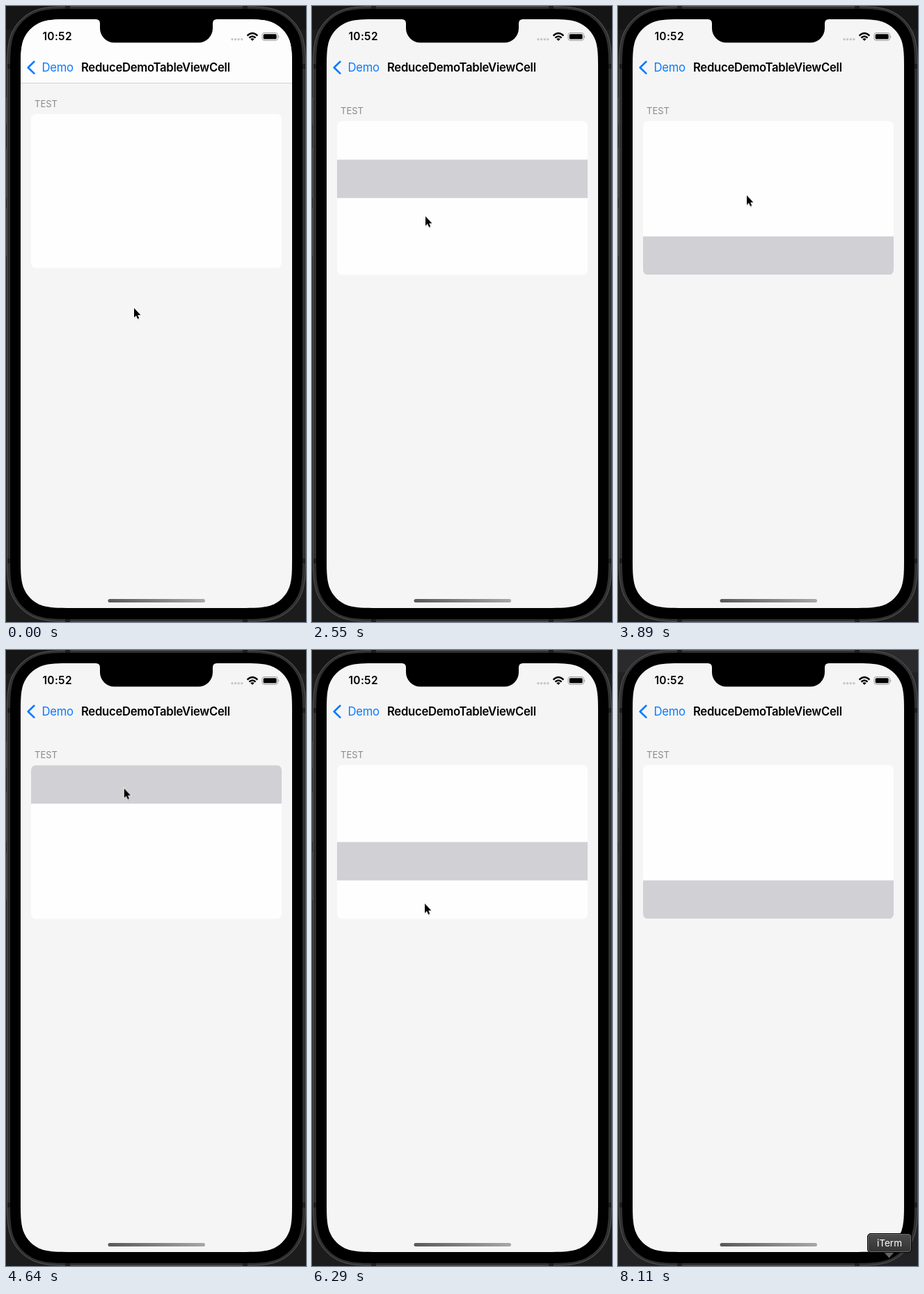
Write an HTML page that moves like this. It is 431x883 px and loops after 8.21 s.

```html
<!DOCTYPE html>
<html lang="en">
<head>
<meta charset="utf-8">
<title>Table cell selection</title>
<style>
  html, body { margin: 0; width: 100%; height: 100%; overflow: hidden; background: #1c1c1d; }
  svg { display: block; width: 431px; height: 883px; }
  text { font-family: Inter, "Liberation Sans", sans-serif; }

  .loop { animation: 8210ms step-end infinite; }
  #content { animation-name: settle; }
  #bar { animation-name: clear; }
  #selection { animation-name: select; }
  #cursor { animation-name: point; }
  .late { animation-name: late; }

  /* The list springs back to rest while the bar loses its fill */
  @keyframes settle {
    0% { transform: translateY(-10px); }
    1.82% { transform: translateY(-5px); }
    3.65% { transform: translateY(-2px); }
    5.48%, 100% { transform: none; }
  }
  @keyframes clear {
    0% { opacity: 1; }
    1.82% { opacity: .5; }
    3.65% { opacity: .2; }
    5.48%, 100% { opacity: 0; }
  }

  /* Rows are 55px high */
  @keyframes select {
    0% { opacity: 0; transform: none; }
    18.27% { opacity: 1; transform: none; }
    25.57% { opacity: 1; transform: translateY(55px); }
    34.71% { opacity: 1; transform: translateY(110px); }
    42.02% { opacity: 1; transform: translateY(165px); }
    51.03% { opacity: 1; transform: translateY(55px); }
    56.51% { opacity: 1; transform: none; }
    69.3% { opacity: 1; transform: translateY(55px); }
    74.78% { opacity: 1; transform: translateY(110px); }
    80.26%, 100% { opacity: 1; transform: translateY(165px); }
  }

  @keyframes point {
    0% { transform: translate(184px, 433px); animation-timing-function: steps(7); }
    12.78% { transform: translate(169px, 198px); }
    14.61% { transform: translate(167px, 192.5px); }
    20.09% { transform: translate(164px, 212px); }
    21.92% { transform: translate(162px, 242px); }
    27.4% { transform: translate(162.5px, 283px); }
    31.05% { transform: translate(163px, 301.5px); }
    36.54% { transform: translate(165px, 326px); }
    38.36% { transform: translate(172px, 359px); }
    43.84% { transform: translate(178px, 345px); }
    45.67% { transform: translate(182px, 308px); }
    47.38% { transform: translate(185px, 271.5px); }
    52.86% { transform: translate(178px, 212px); }
    56.51% { transform: translate(169.7px, 198.5px); }
    58.34% { transform: translate(169px, 185px); }
    63.82% { transform: translate(171px, 215px); }
    65.65% { transform: translate(174px, 244px); }
    71.13% { transform: translate(165px, 301px); }
    76.61% { transform: translate(162px, 363.5px); }
    82.09% { transform: translate(165px, 270px); }
    83.92% { transform: translate(170px, 146px); }
    87.57% { transform: translate(200px, 235px); animation-timing-function: steps(4); }
    94.88%, 100% { transform: translate(390px, 890px); }
  }

  @keyframes late {
    0% { opacity: 0; }
    96.83%, 100% { opacity: 1; }
  }
</style>
</head>
<body>
<svg viewBox="0 0 431 883">
  <defs>
    <linearGradient id="home">
      <stop offset="0" stop-color="#585858"/>
      <stop offset="1" stop-color="#a8a8a8"/>
    </linearGradient>
    <linearGradient id="tip" x2="0" y2="1">
      <stop offset="0" stop-color="#4c4c4d"/>
      <stop offset="1" stop-color="#343435"/>
    </linearGradient>
    <clipPath id="card"><rect x="36" y="165" width="360" height="220.5" rx="7"/></clipPath>
    <clipPath id="screen"><path data-box="21 19 390 844 48.500"/></clipPath>
  </defs>

  <!-- Desktop -->
  <path fill="#1c1c1d" d="M0 0H431V883H0Z"/>
  <path fill="#151516" d="M0 0H431V34H0Z"/>
  <g class="loop late">
    <path fill="#222225" d="M0 0H431V883H0Z"/>
    <path fill="#2a2a2c" d="M0 0H431V32H0Z"/>
  </g>

  <!-- Phone body -->
  <path stroke="#353536" d="M.5 131V170M.5 204V275M.5 290V358"/>
  <path data-box="1.5 .5 429 882 67" fill="#303031" stroke="#565657"/>
  <path stroke="#1d1d1e" stroke-width="7" d="M85 2.5H92M340 2.5H347M85 881H92M340 881H347M2 86.500H6M2 795.500H6M426 86.500H430M426 795.500H430"/>
  <path data-box="6 4 420 875 62"/>

  <!-- Screen -->
  <g clip-path="url(#screen)">
    <path fill="#f5f5f5" d="M21 19H411V863H21Z"/>
    <g id="content" class="loop">
      <text x="41" y="155" font-size="13" fill="#8a8a8d">TEST</text>
      <g clip-path="url(#card)">
        <rect x="36" y="165" width="360" height="221" fill="#fefefe"/>
        <rect id="selection" class="loop" x="36" y="165.300" width="360" height="55" fill="#d1d0d5"/>
      </g>
    </g>
    <g id="bar" class="loop">
      <path fill="#fdfdfd" d="M21 19H411V110H21Z"/>
      <path stroke="#d2d2d3" d="M21 110.500H411"/>
    </g>
    <path d="M129 18V19Q135 19 135 25V32A20.500 20.500 0 0 0 155.500 52.500H276.500A20.500 20.500 0 0 0 297 32V25Q297 19 303 19V18Z"/>
    <rect x="146.500" y="850" width="139.500" height="5" rx="2.500" fill="url(#home)"/>
  </g>

  <!-- Status bar -->
  <text x="52.500" y="49.300" font-size="15.500" font-weight="600" letter-spacing=".3">10:52</text>
  <g fill="#c6c6c7">
    <circle cx="325" cy="47.700" r="1.700"/>
    <circle cx="329.600" cy="47.700" r="1.700"/>
    <circle cx="334.200" cy="47.700" r="1.700"/>
    <circle cx="338.800" cy="47.700" r="1.700"/>
  </g>
  <g fill="none" stroke="#000" stroke-width="2.400">
    <path d="M346.600 42.700Q354 35.500 361.400 42.700M349.400 45.700Q354 41.400 358.600 45.700"/>
    <path fill="#000" stroke="none" d="M351.300 47.300Q354 45 356.700 47.300L354 50Z"/>
  </g>
  <rect x="368" y="38.500" width="22.500" height="10.800" rx="3" fill="none" stroke="#999"/>
  <rect x="369.700" y="40.200" width="19" height="7.400" rx="1.600"/>
  <path fill="#999" d="M391.500 42Q393.400 43.800 391.500 46Z"/>

  <!-- Navigation -->
  <path d="M40.400 79.800L31.700 88.200L40.400 96.600" fill="none" stroke="#0a7aff" stroke-width="2.600" stroke-linecap="round" stroke-linejoin="round"/>
  <text x="51.500" y="94.200" font-size="16.700" letter-spacing="-.3" fill="#0a7aff">Demo</text>
  <text x="108" y="94.200" font-size="16.700" font-weight="600" letter-spacing="-.3">ReduceDemoTableViewCell</text>

  <!-- Dock label -->
  <g class="loop late">
    <path fill="#636364" d="M382 863H397L389.500 871.500Z"/>
    <rect x="358.500" y="836.500" width="63" height="27" rx="4.500" stroke="#000"/>
    <rect x="359.500" y="837.500" width="61" height="25" rx="3.500" fill="url(#tip)" stroke="#6b6b6c"/>
    <text x="390" y="855" font-size="13.600" text-anchor="middle" fill="#fff">iTerm</text>
  </g>

  <g id="cursor" class="loop">
    <path opacity=".15" d="M0 2V15.500L3 12.800L5.200 17.600L8 16.500L6 11.500H10.500Z"/>
    <path stroke="#fff" stroke-width="1.500" paint-order="stroke" d="M0 0V13.500L3 10.800L5.100 15.600L7.300 14.600L5.200 9.900H9.400Z"/>
  </g>
</svg>
<script>
  // Rounded box whose corners ease into the straight sides
  function smoothBox(x, y, w, h, r) {
    const right = x + w, bottom = y + h;
    const corner = (cx, cy, ux, uy, vx, vy) => {
      const at = (u, v) => `${cx + r * (u * ux + v * vx)} ${cy + r * (u * uy + v * vy)} `;
      return at(1.53, 0) +
        'C' + at(1.09, 0) + at(.87, 0) + at(.63, .075) +
        'C' + at(.37, .17) + at(.17, .37) + at(.075, .63) +
        'C' + at(0, .87) + at(0, 1.09) + at(0, 1.53);
    };
    return 'M' + corner(x, y, 0, 1, 1, 0) +
      'L' + corner(right, y, -1, 0, 0, 1) +
      'L' + corner(right, bottom, 0, -1, -1, 0) +
      'L' + corner(x, bottom, 1, 0, 0, -1) + 'Z';
  }

  for (const path of document.querySelectorAll('[data-box]')) {
    path.setAttribute('d', smoothBox(...path.dataset.box.split(' ').map(Number)));
  }
</script>
</body>
</html>
```
